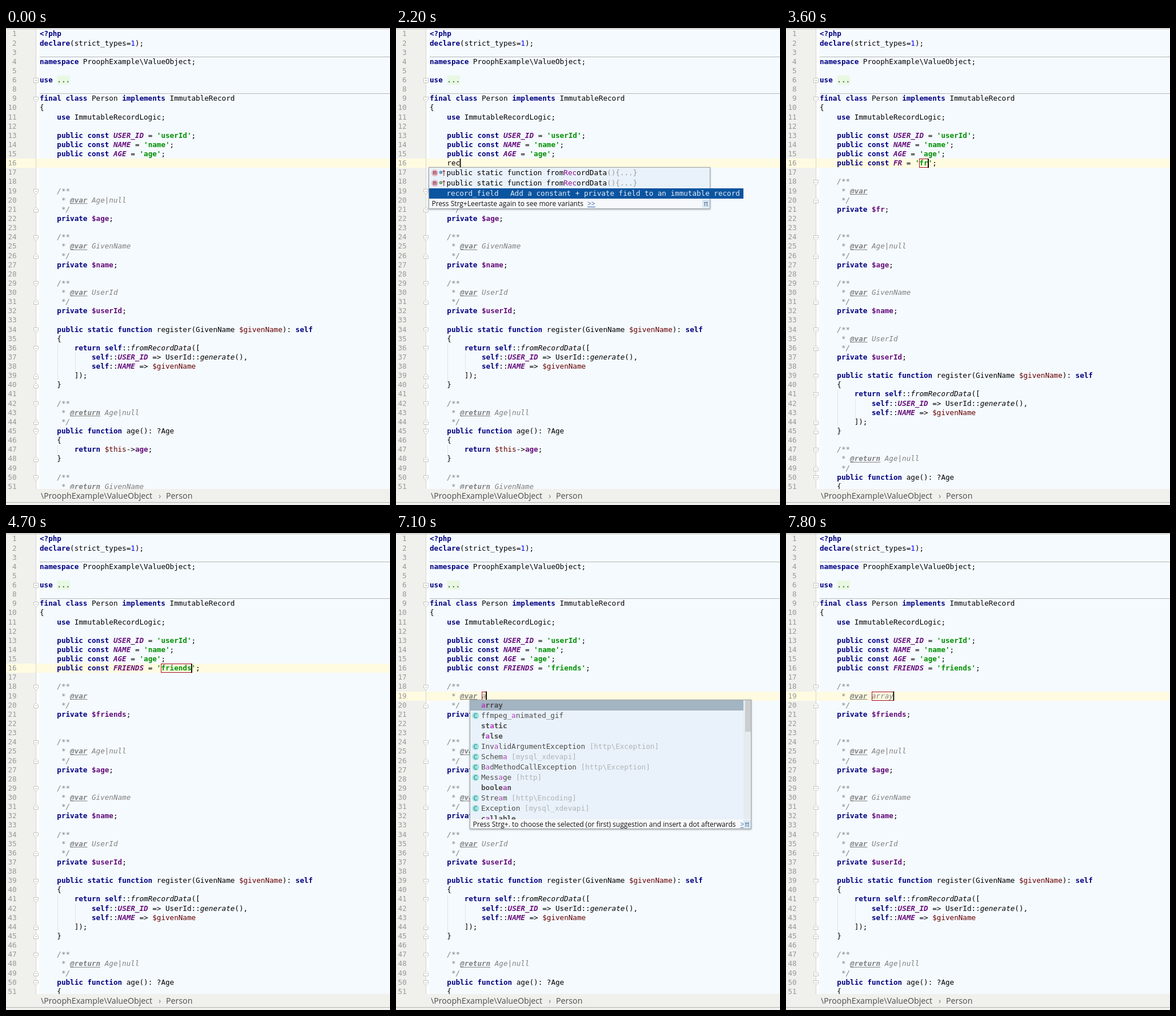
Animation of 672 by 833 pixels, one loop 8 s. Source, as an HTML page with a canvas:

```html
<!DOCTYPE html>
<html lang="en">
<head>
<meta charset="utf-8">
<title>Live template</title>
<style>
  html, body { margin: 0; width: 100%; height: 100%; overflow: hidden; background: #f0f0ed; }
  canvas { display: block; width: 672px; height: 833px; }
</style>
</head>
<body>
<canvas id="stage"></canvas>
<script>
const W = 672, H = 833, LOOP = 8000;
const SIZE = 12.6, CW = SIZE * 0.60205, LEFT = 59;
const ROW = 16.13, TOP = 2.4, BAR = 805;
const MONO = '"DejaVu Sans Mono", monospace', SANS = '"Open Sans", sans-serif';

const canvas = document.getElementById('stage');
const g = canvas.getContext('2d');
const scale = window.devicePixelRatio || 1;
canvas.width = W * scale;
canvas.height = H * scale;

const HEAD = `<?php
declare(strict_types=1);

namespace ProophExample\\ValueObject;

use ...

final class Person implements ImmutableRecord
{
    use ImmutableRecordLogic;

    public const USER_ID = 'userId';
    public const NAME = 'name';
    public const AGE = 'age';`.split('\n');

const property = (type, name) => `    /**
     * @var ${type}
     */
    private $${name};
`;
const getter = (type, name) => `    /**
     * @return ${type}
     */
    public function ${name}(): ?${type.split('|')[0]}
    {
        return $this->${name};
    }
`;
const TAIL = [
  property('Age|null', 'age'),
  property('GivenName', 'name'),
  property('UserId', 'userId'),
  `    public static function register(GivenName $givenName): self
    {
        return self::fromRecordData([
            self::USER_ID => UserId::generate(),
            self::NAME => $givenName
        ]);
    }
`,
  getter('Age|null', 'age'),
  getter('GivenName', 'name')
].join('\n').split('\n');

// Each step changes part of the state from its time on.
const STEPS = [
  [0, { typed: '', caret: false, field: null, doc: null, popup: null, pick: 0 }],
  [600, { typed: 'r', caret: true }],
  [700, { typed: 're' }],
  [800, { popup: 'methods' }],
  [1000, { typed: 'rec' }],
  [1900, { pick: 1, focus: true }],
  [2000, { pick: 2, caret: false }],
  [2200, { caret: true }],
  [2300, { field: '', popup: null }],
  [2600, { parsed: true }],
  [3000, { field: 'f' }],
  [3400, { known: true }],
  [3600, { field: 'fr' }],
  [4100, { field: 'fri' }],
  [4200, { field: 'frie' }],
  [4300, { field: 'frien' }],
  [4500, { field: 'friend' }],
  [4700, { field: 'friends' }],
  [5200, { doc: '', caret: false }],
  [6400, { caret: true }],
  [7000, { doc: 'a' }],
  [7100, { popup: 'types' }],
  [7200, { doc: 'ar' }],
  [7400, { doc: 'arr' }],
  [7500, { doc: 'arra' }],
  [7800, { doc: 'array', popup: null }]
];

const TYPES = {
  a: ['array', 'ffmpeg_animated_gif', 'static', 'false', 'InvalidArgumentException [http\\Exception]',
    'Schema [mysql_xdevapi]', 'BadMethodCallException [http\\Exception]', 'Message [http]', 'boolean',
    'Stream [http\\Encoding]', 'Exception [mysql_xdevapi]', 'callable'],
  ar: ['array', 'InvalidArgumentException [http\\Exception]', 'Warning [mysql_xdevapi]',
    'Parser [http\\Header]', 'Params [http]', 'ArithmeticError', 'InvalidArgumentException'],
  arr: ['array']
};
const WORDS = ['array', 'static', 'false', 'boolean', 'callable'];

const STYLE = {
  plain: ['', '#000'],
  keyword: ['bold', '#000080'],
  string: ['bold', '#009000'],
  constant: ['italic bold', '#660e7a'],
  field: ['bold', '#660e7a'],
  variable: ['', '#660000'],
  call: ['italic', '#000'],
  number: ['', '#0000ff'],
  comment: ['italic', '#808080'],
  tag: ['italic bold', '#808080']
};
const TOKEN = new RegExp([
  "(?<string>'[^']*')",
  '(?<field>(?<=private )\\$\\w*|(?<=->)\\w+)',
  '(?<variable>\\$\\w+)',
  '(?<keyword><\\?php|\\b(?:declare|namespace|use|final|class|implements|public|const|private|static|function|return|self)\\b)',
  '(?<call>\\b(?:fromRecordData|generate)\\b)',
  '(?<constant>\\b[A-Z_]+\\b)',
  '(?<number>\\b\\d+\\b)',
  '(?<plain>\\w+|[^\\s\\w])'
].join('|'), 'g');

const colX = c => LEFT + c * CW;
const rowY = i => TOP + i * ROW;

function fill(color, x, y, w, h) {
  g.fillStyle = color;
  g.fillRect(x, y, w, h);
}

function mono(text, x, y, color, weight = '', size = SIZE) {
  g.font = `${weight} ${size}px ${MONO}`;
  g.fillStyle = color;
  g.fillText(text, x, y);
  return x + text.length * CW;
}

function sans(text, x, y, color, size) {
  g.font = `${size}px ${SANS}`;
  g.fillStyle = color;
  g.fillText(text, x, y);
  return g.measureText(text).width;
}

function path(points, close) {
  g.beginPath();
  points.forEach(([x, y]) => g.lineTo(x, y));
  if (close) g.closePath();
}

function codeLine(line, row, raw) {
  const y = rowY(row) + 12;
  const put = (text, col, kind) => mono(text, colX(col), y, STYLE[kind][1], STYLE[kind][0]);
  if (/^\s*\/?\*/.test(line)) {
    const tag = line.match(/@\w+/);
    if (!tag) return put(line, 0, 'comment');
    const end = tag.index + tag[0].length;
    put(line.slice(0, tag.index), 0, 'comment');
    put(tag[0], tag.index, 'tag');
    put(line.slice(end), end, 'comment');
    fill('#808080', colX(tag.index), y + 1.4, tag[0].length * CW, 1);
    return;
  }
  if (line === 'use ...') {
    put('use', 0, 'keyword');
    fill('#e9f8e3', colX(4), rowY(row), 3 * CW, 16);
    mono('...', colX(4), y, '#507850', 'bold');
    return;
  }
  for (const m of line.matchAll(TOKEN)) {
    let kind = Object.keys(m.groups).find(k => m.groups[k] !== undefined);
    if (raw && kind === 'constant') kind = 'plain';
    if (raw && kind === 'field') kind = 'variable';
    put(m[0], m.index, kind);
  }
}

function foldMark(line, row) {
  const opens = /^\s*\/\*\*|\bclass\b|\bfunction\b|\(\[$/.test(line);
  const closes = /\*\/$|\]\);$|^\s+\}$/.test(line);
  const folded = line === 'use ...';
  if (!opens && !closes && !folded) return;
  const x = 52.5, y = Math.round(rowY(row) + 8.3) + 0.5, d = closes ? -1 : 1;
  path(folded
    ? [[x - 4, y - 4], [x + 4, y - 4], [x + 4, y + 4], [x - 4, y + 4]]
    : [[x - 4, y - 4 * d], [x + 4, y - 4 * d], [x + 4, y + d], [x, y + 4.5 * d], [x - 4, y + d]], true);
  g.fillStyle = '#fff';
  g.fill();
  g.strokeStyle = '#c4c4be';
  g.stroke();
  path([[x - 2, y], [x + 2, y]]);
  g.stroke();
  if (folded) {
    path([[x, y - 2], [x, y + 2]]);
    g.stroke();
  }
}

function guides(lines) {
  for (const col of [4, 8]) {
    lines.forEach((line, i) => {
      const inside = line.search(/\S/) > col && !/^\s*\/?\*/.test(line);
      if (inside) fill('#dfe4e8', Math.round(colX(col)) + 1, rowY(i), 1, ROW);
    });
  }
}

function squiggle(col, row) {
  const x = colX(col), y = rowY(row) + 14;
  path([0, 1, 2, 3, 4].map(i => [x + i * 2, y + (i % 2 ? -1 : 1)]));
  g.strokeStyle = '#e03030';
  g.stroke();
}

function editBox(col, length, row) {
  g.strokeStyle = '#a81020';
  g.strokeRect(Math.round(colX(col)) + 0.5, Math.round(rowY(row)) + 0.5, Math.max(1, Math.round(length * CW)), 15);
}

function frame(x, y, w, h) {
  g.save();
  g.shadowColor = 'rgba(0,0,0,.35)';
  g.shadowBlur = 3;
  g.shadowOffsetY = 1;
  fill('#e9f2fa', x, y, w, h);
  g.restore();
}

function footer(text, x, y, w, linkX) {
  fill('#f7f9fa', x + 1, y, w - 2, 16);
  sans(text, x + 5.5, y + 13, '#111', 12);
  g.save();
  g.beginPath();
  g.rect(x, y, w - 14, 16);
  g.clip();
  const width = sans('>>', linkX, y + 13, '#3a64b0', 12);
  fill('#3a64b0', linkX, y + 14, width, 1);
  g.restore();
  fill('#d6e6f3', x + w - 14, y + 1.5, 13, 14);
  sans('π', x + w - 11.5, y + 12.5, '#4a6a84', 12);
}

function outline(x, y, w, h) {
  g.strokeStyle = '#a0a6aa';
  g.strokeRect(x + 0.5, y + 0.5, w - 1, h - 1);
}

function disc(x, y, r, color) {
  g.fillStyle = color;
  g.beginPath();
  g.arc(x, y, r, 0, 7);
  g.fill();
}

function marked(text, query, x, y, color, mark, weight) {
  const at = text.toLowerCase().indexOf(query), end = at + query.length;
  if (at < 0) return mono(text, x, y, color, weight);
  x = mono(text.slice(0, at), x, y, color, weight);
  x = mono(text.slice(at, end), x, y, mark, weight);
  return mono(text.slice(end), x, y, color, weight);
}

function methodIcon(y, color) {
  disc(68, y, 6, '#e6b8c4');
  mono('m', 64.6, y + 3.3, '#6a2840', '', 11);
  disc(78.5, y - 1, 2.6, color);
  fill('#fff', 78, y - 2, 1, 2);
  fill('#c04050', 83, y - 3, 1.4, 8);
  path([[81, y - 2], [83.7, y - 5.5], [86.4, y - 2]], true);
  g.fill();
}

function methodPopup(s) {
  const x = 57, y = 243, w = 493, h = 73;
  frame(x, y, w, h);
  footer('Press Strg+Leertaste again to see more variants', x, 298, w, 335);
  outline(x, y, w, h);
  for (let i = 0; i < 3; i++) {
    const top = y + 1 + i * 18, base = top + 13, picked = i === s.pick, lit = picked && s.focus;
    const wide = lit && i === 2;
    const ink = lit ? '#fff' : s.focus ? '#000' : '#4c4c4c';
    const mark = lit ? '#f0d0f4' : s.focus ? '#8c108c' : '#b83cc0', soft = lit ? '#e4ecf4' : '#999';
    g.save();
    g.beginPath();
    g.rect(x + 1, top, wide ? 550 : w - 2, 18);
    g.clip();
    if (picked) fill(lit ? '#0a54a0' : '#a3b4c2', x + 1, top, 550, 18);
    if (i < 2) {
      methodIcon(top + 9, i ? '#3c9a48' : '#2f88b8');
      const end = marked('public static function fromRecordData', s.typed, 88.5, base, ink, mark);
      mono('(){...}', end, base, soft);
    } else {
      marked('record_field', s.typed, 88.5, base, lit ? soft : ink, lit ? soft : mark);
      mono('Add a constant + private field to an immutable record', 200, base, soft);
    }
    g.restore();
  }
}

function typePopup(s) {
  const x = 129, y = 291, w = 493;
  const items = TYPES[s.doc] || TYPES.arr;
  const body = Math.min(items.length * 18, 208);
  frame(x, y, w, body + 18);
  g.save();
  g.beginPath();
  g.rect(x, y, w, body + 1);
  g.clip();
  items.forEach((item, i) => {
    const top = y + 1 + i * 18, base = top + 13;
    const [name, pkg] = item.split(' ');
    const word = WORDS.includes(name);
    if (!i) fill('#a3b4c2', x + 1, top, items.length > 11 ? 478 : w - 2, 18);
    if (!word) {
      disc(139.3, top + 9, 6, '#9be3dc');
      sans('C', 135.8, top + 12.7, '#35708a', 10.5);
    }
    const end = marked(name, s.doc, 149, base, '#4c4c4c', '#b83cc0', word ? 'bold' : '');
    if (pkg) mono(pkg, end + CW, base, '#b0b4b8');
  });
  if (items.length > 11) {
    fill('#e6ebef', 608, y + 1, 13, body);
    fill('#cbcdce', 611, y + 1, 10, 55);
  }
  g.restore();
  footer('Press Strg+. to choose the selected (or first) suggestion and insert a dot afterwards', x, y + body + 1, w, 602.5);
  outline(x, y, w, body + 18);
}

function stateAt(t) {
  const s = {};
  for (const [at, change] of STEPS) if (at <= t) Object.assign(s, change);
  return s;
}

function buildLines(s) {
  if (s.field === null) return [...HEAD, '    ' + s.typed, '', '', ...TAIL];
  const f = s.field;
  return [...HEAD, `    public const ${f.toUpperCase()} = '${f}';`, '',
    '    /**', '     * @var ' + (s.doc || ''), '     */', `    private $${f};`, '', '', ...TAIL];
}

function caretPlace(s) {
  if (s.field === null) return { row: 14, col: 4 + s.typed.length };
  const n = s.field.length;
  if (s.doc === null) return { row: 14, col: 21 + 2 * n, start: 21 + n };
  return { row: 17, col: 12 + s.doc.length, start: 12 };
}

function draw(t) {
  const s = stateAt(t), lines = buildLines(s).slice(0, 50), at = caretPlace(s);
  g.setTransform(scale, 0, 0, scale, 0, 0);
  g.lineWidth = 1;
  fill('#f0f0ed', 0, 0, W, H);
  fill('#fdfefe', 53, 2, 5, BAR - 2);
  fill('#f5fafe', 58, 2, W - 58, BAR - 2);
  fill('#fffbe1', 0, Math.round(rowY(at.row)), W, 16);
  fill('#d4d4d0', 52, 2, 1, BAR - 2);
  fill('#b8b8b8', LEFT, 50, W - LEFT, 1);
  fill('#b8b8b8', LEFT, 114, W - LEFT, 1);
  guides(lines);

  lines.forEach((line, i) => {
    const label = String(i < 6 ? i + 1 : i + 2);
    mono(label, 18.6 - label.length * CW, rowY(i) + 12, '#999');
    const fresh = s.field !== null && i >= 14 && i < 20;
    if (!fresh || s.parsed) foldMark(line, i);
    codeLine(line, i, fresh && !s.known);
  });

  if (s.parsed && !s.known) {
    const n = s.field.length;
    squiggle(18 + n, 14);
    squiggle(22 + 2 * n, 14);
    squiggle(12, 19);
  }
  if (at.start !== undefined) editBox(at.start, at.col - at.start, at.row);
  if (s.caret) fill('#000', colX(at.col) - 0.5, rowY(at.row), 1.8, 16);

  if (s.popup === 'methods') methodPopup(s);
  if (s.popup === 'types') typePopup(s);

  fill('#b4b4b2', 0, 1, W, 1);
  fill('#f0f0ed', 0, BAR, W, H - BAR);
  fill('#b4b4b2', 0, 828, W, 1);
  sans('\\ProophExample\\ValueObject', 61, 822, '#4c4c4c', 14.2);
  sans('›', 267, 821.5, '#777', 14.2);
  sans('Person', 280, 822, '#4c4c4c', 14.2);
}

const start = performance.now();
function tick() {
  draw((performance.now() - start) % LOOP);
  requestAnimationFrame(tick);
}
tick();
</script>
</body>
</html>
```
